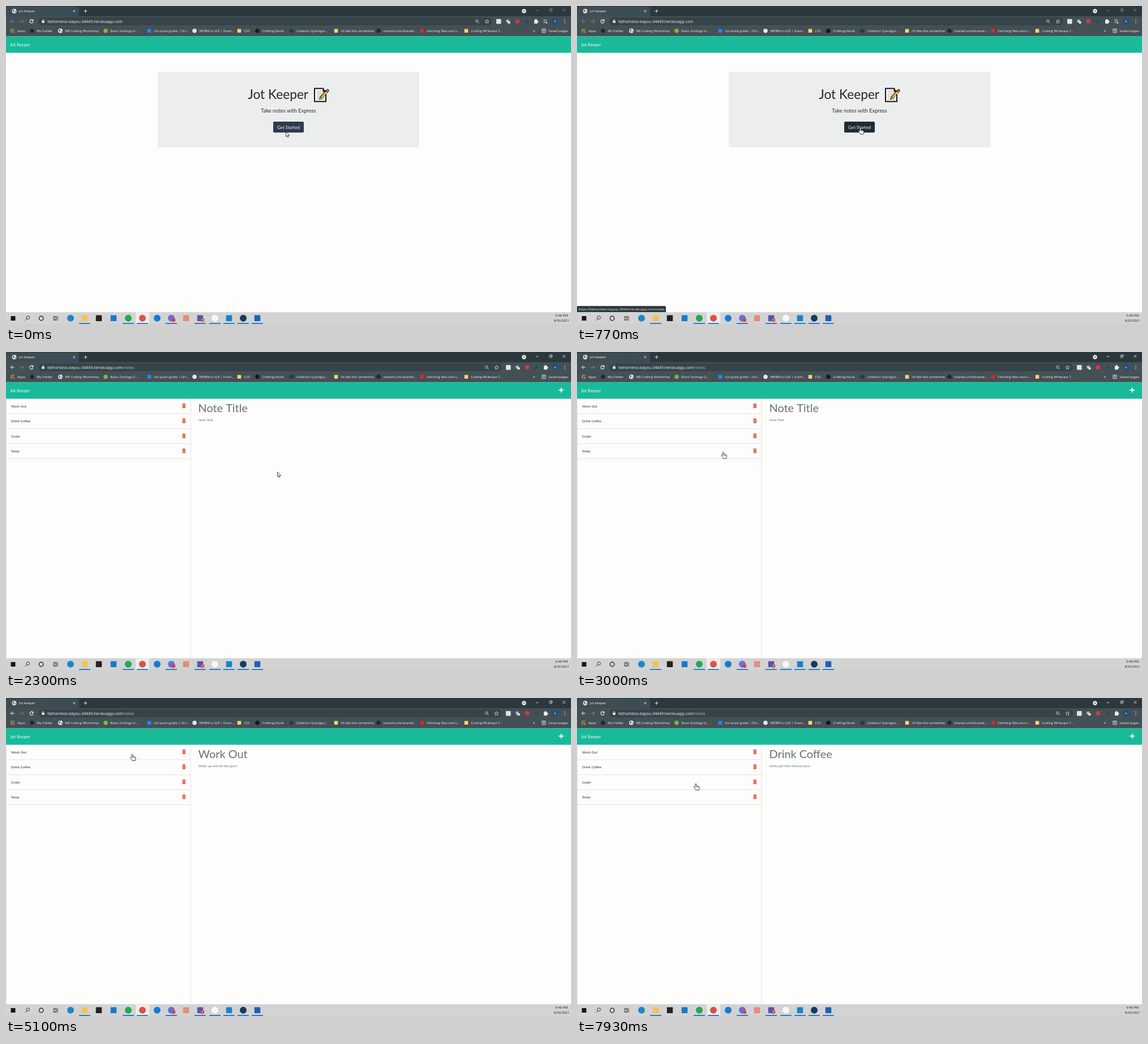
An HTML page with a canvas that plays this animation: 998 px wide and 561 px high, repeating every 8000 ms.

```html
<!DOCTYPE html>
<html lang="en">
<head>
<meta charset="utf-8">
<title>Jot Keeper</title>
<style>
html, body { margin: 0; width: 100%; height: 100%; overflow: hidden; background: #fdfdfc; }
canvas { display: block; width: 998px; height: 561px; }
</style>
</head>
<body>
<canvas id="stage"></canvas>
<script>
const W = 998, H = 561, LOOP = 8000;
const UI = '"Open Sans", sans-serif', PAGE = 'Lato, sans-serif';
const APP = 'Jot Keeper';
const HOST = 'fathomless-bayou-34449.herokuapp.com';

// Moments of change, in ms
const HOVER = 130, STATUS = 260, TOOLBAR = 1170, FOCUS = 2060, OPEN = 2160, FIRST = 3750, SECOND = 6570;

// Pointer hotspot: time, x, y
const PATH = [
  [30, 494.5, 222], [400, 500.5, 214.5], [2250, 500.5, 214.5], [2800, 274, 183],
  [3000, 258.5, 176.5], [3600, 223, 99], [5500, 223, 99], [5530, 223, 100],
  [5730, 223, 100], [6120, 216, 122], [7100, 216, 122], [7550, 210, 151]
];

const BOOKMARKS = [
  [46, 'My Folder', '#22292e'], [96, 'NB Coding Workshop', 'globe'],
  [176, 'Basic Zoology G...', '#79b843'], [253, 'Git quick guide | Orl...', '#2684ff', 1],
  [333, 'WEBM to GIF | Fram...', '#e4e6e7'], [412, 'CSS', '#f5d675', 1],
  [444, 'Crafting.Nook', '#15191b'], [504, 'Collector Quickgui...', '#243f3b'],
  [583, "I'd like this sometime", '#f5d675', 1], [658, 'shared-urls/shared-...', '#22292e'],
  [735, 'Fetching files and s...', '#d52b2b', 1], [813, 'Coding Writeups T...', '#f5d675', 1]
];

// Taskbar marks: x, colour, square, running
const TASKS = [
  [114, '#1b87c9', 0, 0], [139, '#f3c44e', 1, 1], [164, '#222222', 1, 0], [190, '#1879c8', 1, 0],
  [216, '#25a853', 0, 1], [241, '#dd5144', 0, 1], [267, '#157ad5', 0, 0], [292, '#6570dc', 0, 1],
  [318, '#e58d73', 1, 0], [343, '#5358ad', 1, 1], [369, '#f7f7f7', 0, 1], [394, '#1683ca', 1, 1],
  [419, '#183a5c', 0, 1], [444, '#215fb3', 1, 1]
];

const HAND = new Path2D('M-1.1 1 Q0 -.6 1.1 1 V4.3 L5.2 5.3 Q6.5 5.8 6.2 7.4 L5.4 10 V11.6 H-.2 V10.4 L-3.4 6.8 Q-3.5 5 -1.9 5.6 L-1.1 6.4 Z');
const ARROW = new Path2D('M0 0 V8.4 L1.9 6.7 L3.1 9.5 L4.6 8.9 L3.4 6.2 H6 Z');

const canvas = document.getElementById('stage');
const ctx = canvas.getContext('2d');
const dpr = window.devicePixelRatio || 1;
canvas.width = W * dpr;
canvas.height = H * dpr;

function rect(x, y, w, h, color, r = 0) {
  ctx.fillStyle = color;
  ctx.beginPath();
  ctx.roundRect(x, y, w, h, r);
  ctx.fill();
}

function disc(x, y, r, color) {
  ctx.fillStyle = color;
  ctx.beginPath();
  ctx.arc(x, y, r, 0, Math.PI * 2);
  ctx.fill();
}

function stroke(d, color, width = 0.8, x = 0, y = 0) {
  ctx.save();
  ctx.translate(x, y);
  ctx.strokeStyle = color;
  ctx.lineWidth = width;
  ctx.stroke(new Path2D(d));
  ctx.restore();
}

function fill(d, color, x = 0, y = 0) {
  ctx.save();
  ctx.translate(x, y);
  ctx.fillStyle = color;
  ctx.fill(new Path2D(d));
  ctx.restore();
}

function text(str, x, y, size, color, font = UI, align = 'left') {
  ctx.font = `${size}px ${font}`;
  ctx.textAlign = align;
  ctx.fillStyle = color;
  ctx.fillText(str, x, y);
  return ctx.measureText(str).width;
}

function mark(x, y, size, color, square) {
  if (square) rect(x - size / 2, y - size / 2, size, size, color, 0.6);
  else disc(x, y, size / 2, color);
}

function globe(x, y) {
  disc(x, y, 3.9, '#eef1f2');
  fill('M-2.8 -1.6 L-.4 -2.9 L.6 -1 L-1 .2 L-.4 2 L-1.6 2.5 Z M1 .2 L3 -.4 L2.3 2 L1.2 2.6 Z', '#566368', x, y);
}

function tabs(t) {
  const controls = t < FOCUS ? '#87939a' : '#f2f4f5';
  rect(0, 0, W, 18, '#2b393f');
  const shade = ctx.createLinearGradient(0, 0, 128, 0);
  shade.addColorStop(0, '#3f4d52');
  shade.addColorStop(1, '#3a4c57');
  rect(0, 1, 129, 18, shade, [4, 4, 0, 0]);
  globe(14.5, 9);
  text(APP, 23, 11, 5.9, '#f4f6f6');
  stroke('M-1.8 -1.8 L1.8 1.8 M1.8 -1.8 L-1.8 1.8', '#eef1f2', 0.9, 120.5, 9);
  stroke('M-3 0 H3 M0 -3 V3', '#eef1f2', 0.9, 140.5, 9);
  disc(915, 9, 3.7, '#edf0f1');
  fill('M-1.8 -.8 H1.8 L0 1.5 Z', '#2b393f', 915, 9);
  stroke('M935.5 8 H940.5', controls);
  stroke('M960 6.2 H963.6 V9.8 H960 Z M961.2 6 V5 H964.8 V8.6 H963.8', controls, 0.7);
  stroke('M983.3 5 L988.3 10 M988.3 5 L983.3 10', controls);
}

function toolbar(t) {
  const late = t >= TOOLBAR, open = t >= OPEN;
  const dim = '#7c888d', light = '#e9eced', base = '#435055';
  const shift = late ? 17 : 0;
  rect(0, 18, W, 35.5, base);
  rect(57, 20, 802 + shift, 14, '#36444a', 7);
  stroke('M3.4 0 H-3 M0 -3 L-3 0 L0 3', open ? '#f1f3f4' : dim, 1, 11.5, 27);
  stroke('M-3.4 0 H3 M0 -3 L3 0 L0 3', dim, 1, 28, 27);
  stroke('M2.3 -1.8 A3 3 0 1 0 2.9 1', '#f1f3f4', 1.1, 45, 27);
  fill('M3.5 -3.7 V-.2 H0 Z', '#f1f3f4', 45, 27);
  rect(63.3, 26, 4.6, 3.8, light, 0.5);
  stroke('M-1.3 0 V-1.2 A1.3 1.3 0 0 1 1.3 -1.2 V0', light, 0.7, 65.6, 26);
  const w = text(HOST, 73, 29.5, 6.93, '#f4f6f6');
  if (open) text('/notes', 73 + w, 29.5, 6.93, '#b5bdc0');

  stroke('M2 0 A2.2 2.2 0 1 0 -2.4 0 A2.2 2.2 0 1 0 2 0 M1.4 1.6 L3.6 3.7', light, 0.8, 832 + shift, 26.5);
  stroke('M0 -3.5 L1 -1.2 L3.5 -1 L1.6 .6 L2.2 3.1 L0 1.8 L-2.2 3.1 L-1.6 .6 L-3.5 -1 L-1 -1.2 Z', light, 0.7, 849.5 + shift, 27.3);
  rect(866 + shift, 23, 8.5, 8.5, '#e3e5e5', 0.8);
  mark(886 + shift, 26.5, 5, '#b3babd', 1);
  mark(888.5 + shift, 29, 4, '#e6e8e9', 1);
  mark(903.5 + shift, 27, 7, '#d33a3a', t >= HOVER);
  mark(920 + shift, 27, 6, '#21515a');
  rect(933 + shift, 24.5, 6, 6.5, light, 0.6);
  disc(936 + shift, 24.3, 1.4, light);
  disc(939.3 + shift, 27.6, 1.4, light);
  if (!late) {
    stroke('M949.5 24.5 H955 M949.5 27 H955 M949.5 29.5 H952.5', light);
    fill('M954 27.8 L957 29.5 L954 31.2 Z', light);
  }
  disc(970, 27, 5.2, '#164f86');
  text('A', 970, 29.2, 6, '#e9f2fa', UI, 'center');
  for (const dy of [-2.8, 0, 2.8]) disc(987, 27 + dy, 0.75, light);
}

function bookmarks() {
  const colors = ['#e25a4e', '#e5b643', '#55ae69'];
  for (let i = 0; i < 9; i++) rect(8 + i % 3 * 2.6, 40.3 + Math.floor(i / 3) * 2.6, 1.8, 1.8, colors[(i + Math.floor(i / 3)) % 3]);
  text('Apps', 20, 45.8, 6, '#f1f3f3');
  for (const [x, label, color, square] of BOOKMARKS) {
    if (color === 'globe') globe(x, 43.7);
    else mark(x, 43.7, square ? 6.5 : 7.6, color, square);
    text(label, x + 8.3, 45.8, 6, '#f1f3f3');
  }
  text('»', 930.5, 46, 8, '#f1f3f3');
  stroke('M-3.2 -3.2 H3.2 V3.2 H-3.2 Z M0 -3.2 V3.2 M-2.1 -1.3 H-.8 M-2.1 .3 H-.8 M.9 -1.3 H2.2 M.9 .3 H2.2', '#e3e7e8', 0.8, 950, 43.7);
  text('Saved pages', 958.3, 45.8, 6, '#f1f3f3');
}

function memo() {
  rect(544, 144.5, 22, 25, '#111111', 0.7);
  rect(546, 146.5, 18, 21, '#fbfbf8');
  fill('M560 144 H567 V151 Z', '#ebeeec');
  fill('M559.5 145 L566 151.5 H559.5 Z', '#111111');
  for (let y = 150; y < 166; y += 3) stroke(`M548.5 ${y} H${y < 153 ? 558 : 562}`, '#9da3a5', 0.9);
  fill('M553 165.4 L554.6 160 L566.5 147.4 Q568 145.7 570 147.7 Q571.6 149.4 570.2 150.8 L558.3 163.2 Z', '#161616');
  fill('M555.8 160.4 L565.4 150.2 L568 152.7 L558 162.4 Z', '#f4bd3d');
  fill('M566.2 149.4 L568 147.6 L570 149.8 L568.4 151.7 Z', '#d69791');
  fill('M554.3 164 L555.1 161.1 L557.2 162.9 Z', '#e7c9a0');
}

function landing(t) {
  rect(268, 116, 462, 133.5, '#ebeeed', 2);
  text(APP, 480.7, 164, 22.7, '#23282c', PAGE, 'center');
  memo();
  text('Take notes with Express', 499, 188.3, 9.27, '#272c2f', PAGE, 'center');
  const k = Math.min(1, Math.max(0, (t - HOVER) / 150));
  const mix = (a, b) => Math.round(a + (b - a) * k);
  rect(472, 204, 54, 19.3, `rgb(${mix(43, 30)},${mix(60, 43)},${mix(77, 55)})`, 2);
  text('Get Started', 499, 216.5, 7.95, '#fafbfb', PAGE, 'center');
  if (t >= STATUS) {
    rect(0, 529.3, 157, 11, '#2d383d', [0, 2, 0, 0]);
    text(`https://${HOST}/notes`, 2.5, 537, 5.94, '#eef1f1');
  }
}

function trash(x, y) {
  const red = '#df5147';
  rect(x - 3.2, y - 3.5, 6.4, 1.2, red, 0.3);
  rect(x - 1.2, y - 4.2, 2.4, 1, red);
  rect(x - 2.7, y - 1.8, 5.4, 6, red, 0.7);
  for (const dx of [-1.3, 0, 1.3]) stroke(`M${x + dx} ${y - 0.8} V${y + 3.2}`, '#f6cbc6', 0.5);
}

function notes(t) {
  const line = '#dedfe2';
  stroke('M.4 82 V540 M326 82 V540', line, 0.9);
  ['Work Out', 'Drink Coffee', 'Code!', 'Sleep'].forEach((label, i) => {
    const y = 95.5 + i * 26.45;
    text(label, 9, y + 2.2, 6.15, '#292e31', PAGE);
    trash(314.3, y - 0.7);
    stroke(`M0 ${y + 13.3} H326`, line, 0.9);
  });
  const [title, body] = t < FIRST ? ['Note Title', 'Note Text']
    : t < SECOND ? ['Work Out', 'Wake up and hit the gym!']
    : ['Drink Coffee', 'Gotta get that miracle juice'];
  text(title, 339.5, 105.6, 19.9, '#6b7073', PAGE);
  text(body, 339.7, 121.6, 6.1, '#6f7477', PAGE);
}

function taskbar() {
  rect(0, 540.3, W, 21, '#d3d3d4');
  rect(229, 540.3, 24, 21, '#ececec');
  mark(12.5, 551, 8, '#171717', 1);
  stroke('M4 -1.2 A2.8 2.8 0 1 0 -1.6 -1.2 A2.8 2.8 0 1 0 4 -1.2 M-.7 .8 L-3.7 4', '#222', 0.9, 37.5, 550.8);
  stroke('M3.8 0 A3.8 3.8 0 1 0 -3.8 0 A3.8 3.8 0 1 0 3.8 0', '#171717', 1.2, 62.2, 551);
  stroke('M-3.5 -1.8 H1.5 V1.8 H-3.5 Z M-3.5 -4 V-3.2 H1.5 V-4 M-3.5 4 V3.2 H1.5 V4 M3.5 -4 V4', '#222', 0.8, 87.5, 551);
  for (const [x, color, square, running] of TASKS) {
    mark(x, 550.7, square ? 10.5 : 12, color, square);
    if (running) rect(x - 10, 559.3, 20, 1.7, '#1474c4');
  }
  for (const x of [296, 347]) {
    disc(x, 554, 3.3, '#d9423f');
    if (x > 300) text('3', x, 556, 5, '#fff', UI, 'center');
  }
  text('9:48 PM', 981.3, 548.2, 5.9, '#1d1d1d', UI, 'center');
  text('8/30/2021', 981.3, 557.3, 5.75, '#1d1d1d', UI, 'center');
}

function pointerAt(t) {
  if (t <= PATH[0][0]) return PATH[0].slice(1);
  for (let i = 1; i < PATH.length; i++) {
    const [t0, x0, y0] = PATH[i - 1], [t1, x1, y1] = PATH[i];
    if (t < t1) {
      const k = (t - t0) / (t1 - t0);
      return [x0 + (x1 - x0) * k, y0 + (y1 - y0) * k];
    }
  }
  return PATH[PATH.length - 1].slice(1);
}

function pointer(t) {
  const [x, y] = pointerAt(t);
  const link = t < OPEN ? t >= HOVER : x < 326;
  const shape = link ? HAND : ARROW;
  ctx.save();
  ctx.translate(x, y);
  ctx.fillStyle = '#fff';
  ctx.fill(shape);
  ctx.strokeStyle = '#1a1a1a';
  ctx.lineWidth = 0.8;
  ctx.lineJoin = 'round';
  ctx.stroke(shape);
  if (link) stroke('M1.1 4.4 V6.6 M2.8 4.8 V6.8 M4.4 5.2 V7', '#1a1a1a', 0.5);
  ctx.restore();
}

function draw(t) {
  ctx.setTransform(dpr, 0, 0, dpr, 0, 0);
  rect(0, 0, W, H, '#fdfdfc');
  tabs(t);
  toolbar(t);
  bookmarks();
  rect(0, 53.5, W, 29, '#19ba9a');
  text(APP, 7, 70.9, 7.55, '#f8fdfb', PAGE);
  if (t < OPEN) landing(t);
  else {
    stroke('M-4.2 0 H4.2 M0 -4.2 V4.2', '#f8fdfb', 1.9, 980.7, 67.3);
    notes(t);
  }
  taskbar();
  pointer(t);
}

const start = performance.now();
function frame() {
  draw((performance.now() - start) % LOOP);
  requestAnimationFrame(frame);
}
frame();
</script>
</body>
</html>
```
